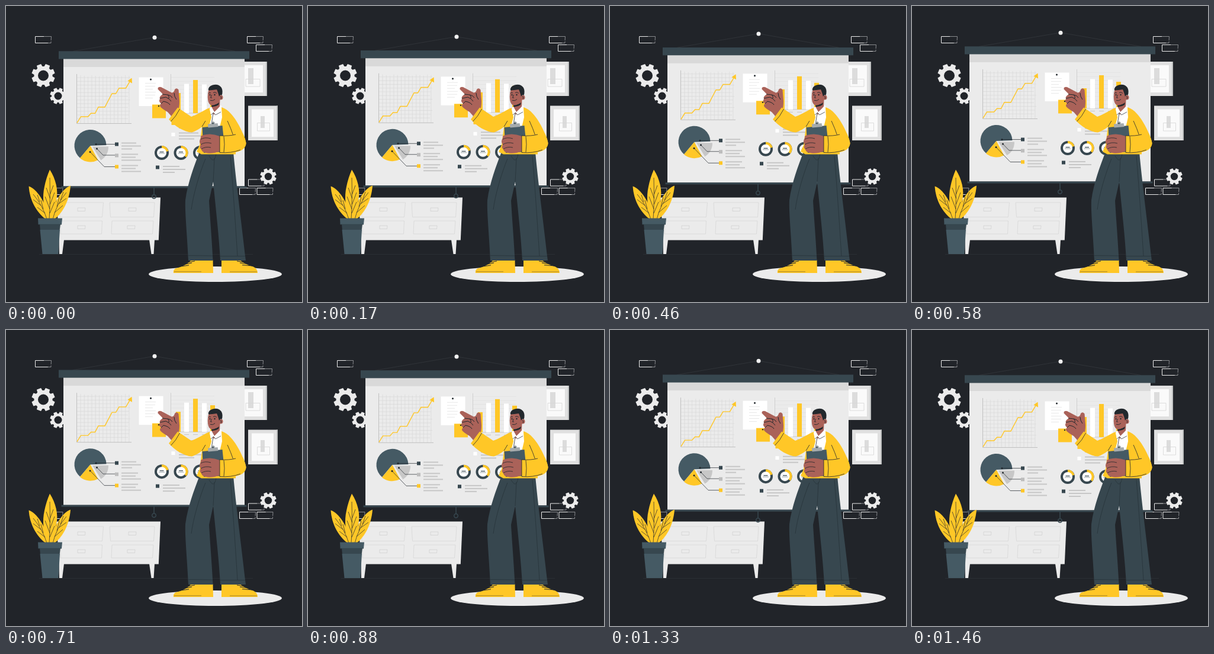
An HTML page with a canvas that plays this animation: 500 by 500 pixels, repeating every 1.5 s.

```html
<!DOCTYPE html>
<html lang="en">
<head>
<meta charset="utf-8">
<title>Presentation</title>
<style>
html, body { margin: 0; width: 100%; height: 100%; overflow: hidden; background: #212429; }
canvas { display: block; width: 100vw; height: 100vh; }
</style>
</head>
<body>
<canvas id="stage" width="500" height="500"></canvas>
<script>
const ctx = document.getElementById('stage').getContext('2d');
const LOOP = 1500, STEP = LOOP / 36, TAU = Math.PI * 2;
const BG = '#212429', DARK = '#37474f', SLATE = '#455a64', YELLOW = '#ffc727', PALE = '#ebebeb';
const GREY = '#c7c7c7', SKIN = '#aa6259', INK = '#22282d', WHITE = '#fff';

function rect(x, y, w, h, color) {
  ctx.fillStyle = color;
  ctx.fillRect(x, y, w, h);
}
function fill(d, color) {
  ctx.fillStyle = color;
  ctx.fill(new Path2D(d));
}
function line(d, color, width = 1) {
  ctx.strokeStyle = color;
  ctx.lineWidth = width;
  ctx.stroke(new Path2D(d));
}
function disc(x, y, r, color) {
  ctx.fillStyle = color;
  ctx.beginPath();
  ctx.arc(x, y, r, 0, TAU);
  ctx.fill();
}
function wedge(x, y, r, from, to, color) {
  ctx.fillStyle = color;
  ctx.beginPath();
  ctx.moveTo(x, y);
  ctx.arc(x, y, r, from * TAU / 360, to * TAU / 360);
  ctx.fill();
}
function textBars(x, y, widths, gap = 5) {
  widths.forEach((w, i) => rect(x, y + i * gap, w, 2, GREY));
}

function brick(x, y, w = 27, h = 11) {
  line(`M${x + w * .55} ${y}H${x}v${h}h${w * .8}`, PALE, 1);
  line(`M${x + w * .55} ${y}h${w * .45}l-.4 ${h * .6}M${x + w - .5} ${y + h * .75}v${h * .25}h${-w * .2}`, '#b5b7b9', .7);
}

function gear(x, y, r, hole) {
  const teeth = 8, pitch = TAU / teeth;
  ctx.beginPath();
  for (let i = 0; i < teeth; i++) {
    const a = (i + .5) * pitch;
    [[-.37, .78], [-.25, 1], [.25, 1], [.37, .78]].forEach(([da, k]) =>
      ctx.lineTo(x + Math.cos(a + da * pitch) * r * k, y + Math.sin(a + da * pitch) * r * k));
  }
  ctx.closePath();
  ctx.moveTo(x + hole, y);
  ctx.arc(x, y, hole, 0, TAU, true);
  ctx.fillStyle = PALE;
  ctx.fill('evenodd');
}

function picture(x, y, h, barX, barY, barW, barH, box) {
  rect(x, y, 50, h, '#e0e0e0');
  rect(x + 48, y, 2, h, '#bfc1c1');
  rect(x + 6, y + 6, 37, h - 12, '#fafafa');
  rect(barX, barY, barW, barH, '#dcdcdc');
  line(box, '#d6d6d6', .8);
}

function wall() {
  rect(0, 0, 500, 500, BG);
  brick(49.5, 51.5);
  brick(407.5, 51.5);
  brick(422.5, 65.5);
  brick(409.5, 293);
  brick(394.5, 307.5);
  brick(424, 307.5);
  brick(69, 307.5);
  gear(63, 117.5, 20, 9);
  gear(88, 152, 14, 6.5);
  disc(443, 288, 14, BG);
  gear(443, 288, 14, 6.2);
  picture(391, 94, 58, 409, 105, 9, 27, 'M405 123.500H429V136H405Z');
  picture(409, 168.5, 58.5, 430, 186, 7, 20, 'M424.500 197.500H445.500V211H424.500Z');
  line('M56 419.500H417', '#2d3136', .8);
}

function lineChart() {
  ctx.strokeStyle = '#d6d6d6';
  ctx.lineWidth = .6;
  ctx.beginPath();
  for (let i = 0; i < 14; i++) {
    ctx.moveTo(126 + i * 6.3, 117 + (i % 3));
    ctx.lineTo(126 + i * 6.3, 198);
  }
  for (let i = 0; i < 12; i++) {
    ctx.moveTo(120, 121 + i * 6.3);
    ctx.lineTo(210 - (i % 3) * 2, 121 + i * 6.3);
  }
  ctx.stroke();
  line('M119.500 115V198.500H212', '#b5b5b5', .8);
  line('M120 197.500L126.500 187H138.500L143.500 181.300H150.500L156 170.800H167L179 148H185.500L191 138.700H202.500L210 126', YELLOW, 1.4);
  fill('M212.500 121.500L205.500 126.500L213 130.500Z', YELLOW);
}

function barChart() {
  for (let i = 0; i < 10; i++) line(`M279 ${120.5 + i * 6.7}H352`, '#dadada', .5);
  line('M278.500 115V194M278.500 181H358', '#c2c2c2', .7);
  [[287, 147, YELLOW], [301, 131.5, WHITE], [316, 125, YELLOW], [331, 132.5, WHITE], [345, 136, YELLOW]]
    .forEach(([x, y, color]) => {
      rect(x, y, 8, 181 - y, color);
      rect(x, 185, 8, 1, GREY);
    });
  rect(279.5, 195, 6, 6, YELLOW);
  textBars(292, 195, [33, 39, 26]);
  rect(279.5, 214, 6, 6, WHITE);
  textBars(292, 213.5, [33, 39, 26]);
}

function pieChart() {
  wedge(142.5, 236, 27, 130, 358, SLATE);
  wedge(146, 237.5, 27, 0, 58, GREY);
  wedge(142.5, 236, 27.5, 62, 130, YELLOW);
  line('M152 233.500H187M153.500 241L164 252H187M142 246.500L166 271.500H187', INK, .7);
  [[152, 233.5], [153.5, 241], [142, 246.5]].forEach(([x, y]) => disc(x, y, 1.5, INK));
  [DARK, '#bdbdbd', YELLOW].forEach((color, i) => rect(184, 230.5 + i * 19, 6, 6, color));
  textBars(195, 230.5, [25, 33, 18]);
  textBars(195, 249.5, [28, 24, 33]);
  textBars(195, 268.5, [28, 24, 33]);
}

function donut(x, share) {
  disc(x, 248, 12, DARK);
  wedge(x, 248, 12, -90, -90 + share, YELLOW);
  disc(x, 248, 8, WHITE);
  rect(x - 3.5, 246, 7, 1.2, DARK);
  rect(x - 5, 248.6, 10, .8, '#78858b');
}

function projector(dy) {
  ctx.save();
  ctx.translate(0, dy);
  line('M113 76.500L251 53L387 76.500', '#34383d', .8);
  disc(251, 53.2, 3.5, '#f2f2f2');
  rect(97, 88, 306, 216.5, PALE);
  rect(97, 89, 306, 14, '#d9d9d9');
  rect(89, 76.3, 322, 13.2, DARK);
  rect(93.5, 304.5, 313, 3, DARK);
  lineChart();
  barChart();

  rect(224.5, 120.5, 41, 48.5, WHITE);
  for (let i = 0; i < 6; i++) rect(235, 130 + i * 5, [18, 17, 13][i % 3], .7, '#dedede');
  disc(244.5, 124, 1.5, INK);
  rect(247, 166.5, 23, 23, YELLOW);
  disc(258, 169, 1.2, INK);

  pieChart();
  donut(263, 75);
  donut(295.5, 130);
  donut(328, 100);
  rect(253, 269.5, 6, 6, DARK);
  textBars(265, 270, [28, 38, 20]);
  ctx.restore();
}

function pullRing(dy) {
  ctx.save();
  ctx.translate(0, dy);
  line('M250 307V318.500M246.700 322a3.300 3.300 0 1 0 6.600 0a3.300 3.300 0 1 0 -6.600 0', DARK, 1.5);
  ctx.restore();
}

function cabinet() {
  fill('M85 323.500H261L257.800 395.500H90Z', PALE);
  fill('M89.500 395H98L95 419H90Z M242 395H251L249.500 419H245.500Z', PALE);
  line('M91 332H164.500L162.500 356.500H91ZM175 332H251L249.500 356.500H176.500Z' +
       'M92 363H162.500L161.500 385H92ZM179 363H249L247.500 385H178Z', '#d4d4d4', .7);
  [[121, 341], [207, 341], [121, 371], [205, 371]].forEach(([x, y]) =>
    line(`M${x} ${y}h13l-.5 5.500h-12.500Z`, '#cfcfcf', .7));
}

function plant() {
  fill('M38.500 304.500C52 309 67 331 73 360H67C51 348 40 328 38.500 304.500Z', YELLOW);
  fill('M109 303.500C95 308 80 332 76 360H82C96 349 107 329 109 303.500Z', YELLOW);
  fill('M74 276.500C84 292 89 312 85 328Q82 345 76 360H70C63 342 61 322 65 305Q68 290 74 276.500Z', YELLOW);
  line('M74 290Q75 330 73 360M74.500 318L80 303M74.500 335L82 315M74 350L82 331M74.500 325L68 307M74 343L66 322', INK, .7);
  line('M46 318Q62 337 69 360M57 331L53 319M63 343L59 328M59 337L46 327M66 350L53 340', INK, .7);
  line('M102 315Q85 335 79 360M92 328L97 314M86 339L90 323M89 334L102 325M82 349L96 337', INK, .7);
  fill('M57 368H92L90.500 380H58Z', DARK);
  fill('M57.500 378H91L88.500 419H61.500Z', SLATE);
  fill('M54 358.500H95L94 369H54.500Z', SLATE);
  line('M54.500 369H94', '#303f46', .7);
}

function legsAndShoes() {
  ctx.fillStyle = PALE;
  ctx.beginPath();
  ctx.ellipse(353.5, 453, 112.500, 13, 0, 0, TAU);
  ctx.fill();
  fill('M313 429H349.500L350 451H283Q282 446 286 443.500Q304 439 313 429Z', YELLOW);
  fill('M364 429H395Q405 437 418 440.500Q425 444 425 451H364Z', YELLOW);
  line('M284 448.800H330M378 449H424', '#8f7329', .8);
  line('M303 433.500L319 431M299 437L314 434M294 440L309 438M390 431L408 433.500M395 434L412 436M399 437.500L416 439', INK, 1);
  fill('M327 246H384C388 292 397 360 405 430H362C360 390 354 340 350 297L343 329C345 363 348 398 349.500 430H308C306 386 302 349 303 328C307 298 318 270 327 246Z', DARK);
  line('M343 253Q352 269 355 249M352 257Q351 280 350 297M337 258C327 282 316 319 313 344M379 253Q384 312 391 422M308 421.500L349 422M362 422.500H404', '#28343a', .8);
}

function head() {
  fill('M347 158H361.500L361 170L351 184L347 174Z', SKIN);
  fill('M347 166Q354 168 360 163L359 167Q353 171 347 170Z', INK);
  disc(362.500, 154.500, 4, SKIN);
  fill('M343 140Q340 149 341 158Q342 167 348 168Q357 167 361 158L362 142L355 136Z', SKIN);
  fill('M342 142.500Q341 136 349 133.500Q359 131 364 138Q367 144 364.500 151Q362 149 360 153Q358 145 356 141Q348 142 342 142.500Z', INK);
  line('M342 147.500Q344 145.500 346 147M350 146.500Q353 144.500 356 147.500M347.500 150L345.500 155H348M345 159.500Q350 161 353 157.500M362 153Q365 153 363 157', INK, .9);
  disc(344.500, 150.200, 1.100, INK);
  disc(352.500, 150, 1.200, INK);
}

function pointingHand() {
  fill('M256.500 140.500Q256 136 262 137L280 146.500Q284 146 285 141Q288 137.500 291.500 141.500L293 161Q293 170 291 176L281 188L273 179Q264 174 260.500 170Q259 167 262 165Q257 161 260 157Q258 153 265 149Z', SKIN);
  line('M264 149L273 150Q279 151 281 155M260 156L270 154Q276 156 279 161M262 165L266 161Q275 163 277 167M273 150Q277 154 274 157M284 147Q284 153 288 158', INK, 1);
}

function torso() {
  fill('M345 171L364 168L366 205H342Z', WHITE);
  fill('M344 172L339 174C330 179 321 184 313 187L290 171.500L275 191.500C285 203 301 213 314 213.500Q324 210 331 204L327 235L322 246L330 250.500H388V247C399 245 406 239 405.500 231C402 216 390 192 379 181Q373 174 364 171L365 188L361 205L343 203L347 188Z', YELLOW);
  line('M278.500 195Q287 187 293.500 174M331 204L337 194M374 194Q380 207 384 219M350 181L347 200', INK, .8);
}

function collar() {
  fill('M347 170L352 179L361 170L363 179L354 184L350.500 180L346 184L344 174Z', WHITE);
  line('M346 184L350.500 180L354 184L363 179', INK, .7);
}

function clipboardAndArm() {
  fill('M331.500 205L365.500 202L370 246L334 248Z', SLATE);
  fill('M341 199.500L346 199Q346 195 349.500 195Q353 195 353 198.500L357.500 198L358.500 204L341.500 205.500Z', '#a5abad');
  disc(349.500, 198.300, 1.300, DARK);
  fill('M361 219Q374 220 386 217L400 215Q405 225 405.500 232Q405 239 396 243Q380 249 361 247.500Z', YELLOW);
  fill('M329 223Q328 219 333 218Q347 214 361 220V245Q350 250 340 248.500Q330 247 330 242Q326 239 329 234Q325 229 329 223Z', SKIN);
  line('M329 225Q336 221 346 224M329 234Q337 229 347 232M330 241.500Q337 237 346 239', INK, .8);
  line('M361 219Q377 220 388 217M361 219V247.500Q380 249 396 243M368 220Q370 234 368 247', INK, .8);
}

function draw(now) {
  const t = Math.floor((now % LOOP + 4) / STEP) * STEP;
  const dy = 4.45 * (Math.cos((t + 15) / LOOP * TAU) - 1);
  wall();
  projector(dy);
  cabinet();
  pullRing(dy);
  plant();
  legsAndShoes();
  pointingHand();
  torso();
  head();
  collar();
  clipboardAndArm();
}

const start = performance.now();
function tick() {
  draw(performance.now() - start);
  requestAnimationFrame(tick);
}
tick();
</script>
</body>
</html>
```
